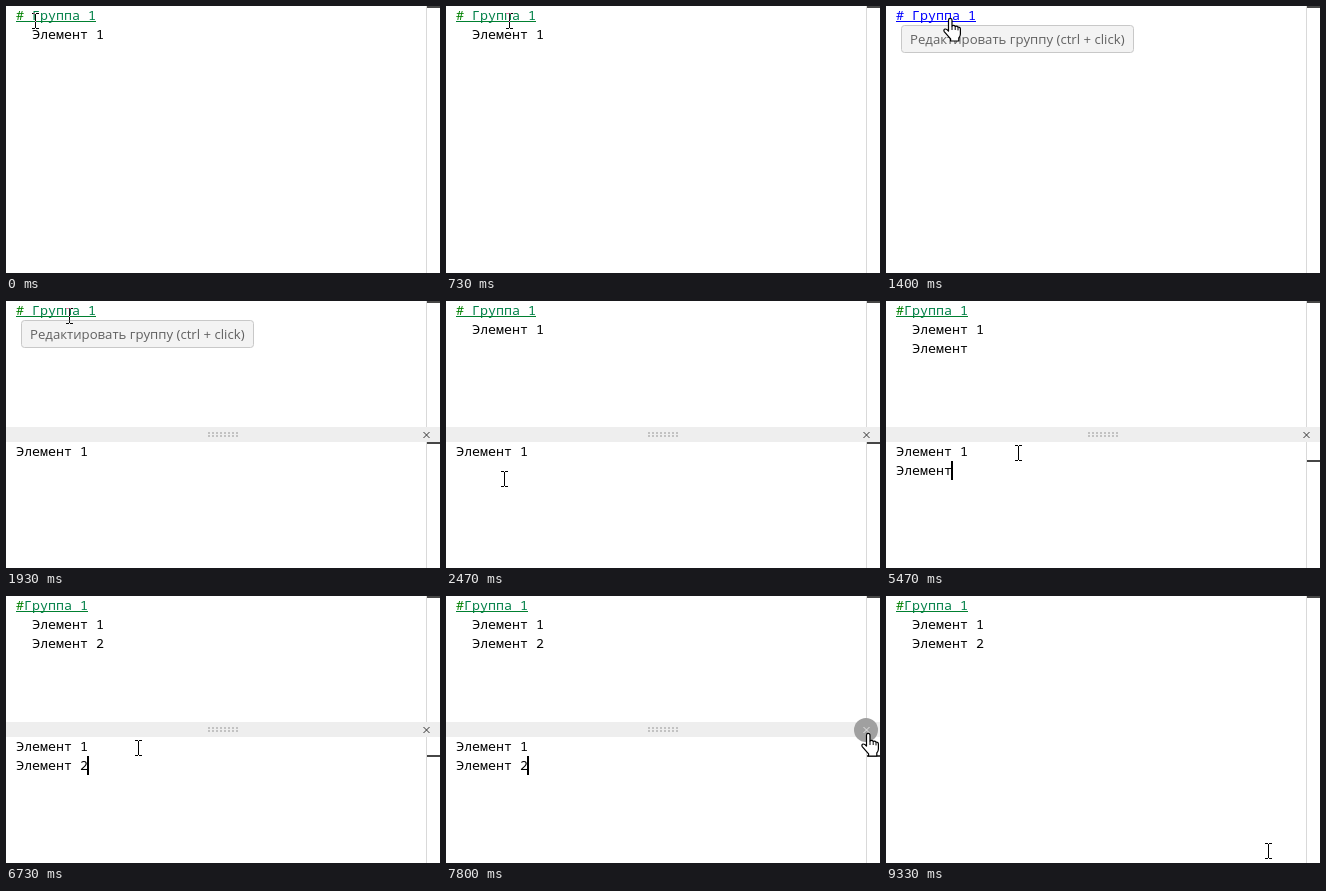
An HTML page that plays this animation: 434 px wide and 267 px high, repeating every 9400 ms.

```html
<!DOCTYPE html>
<html lang="ru">
<head>
<meta charset="utf-8">
<style>
  html, body { margin: 0; width: 100%; height: 100%; overflow: hidden; background: #fff; }
  svg { display: block; }
  rect { shape-rendering: crispEdges; }
  .code { font: 13.333px "Noto Sans Mono", "DejaVu Sans Mono", monospace; }
  .hint { font: 13.2px "Open Sans", "Noto Sans", sans-serif; fill: #616161; }
  .mark { fill: #464646; }
  .edge { fill: #d9d9d9; }
  #beam { fill: #fff; mix-blend-mode: difference; }
</style>
</head>
<body>
<svg width="434" height="267" viewBox="0 0 434 267">
  <rect width="434" height="267" fill="#fff"/>
  <rect class="edge" x="420" width="1" height="267"/>
  <rect class="mark" x="421" width="13" height="2"/>
  <g class="code">
    <text x="10" y="14"><tspan id="hash">#</tspan><tspan id="title"></tspan></text>
    <rect id="underline" x="10" y="15" height="1"/>
    <text x="26" y="33">Элемент 1</text>
    <text id="copy" x="26" y="52"></text>
  </g>
  <g id="panel">
    <rect y="126" width="434" height="141" fill="#fff"/>
    <rect y="126" width="434" height="15" fill="#eee"/>
    <path d="M202 132h32m-32 3h32" stroke="#c2c2c2" stroke-width="2" stroke-dasharray="2"/>
    <circle id="halo" cx="420" cy="134" r="12" fill="#a0a0a0"/>
    <path id="cross" d="M417.5 131l6 6m0-6l-6 6"/>
    <g id="editor" class="code">
      <rect class="edge" x="420" y="141" width="1" height="126"/>
      <rect id="row" class="mark" x="421" width="13" height="2"/>
      <text x="10" y="155">Элемент 1</text>
      <text id="typed" x="10" y="174"></text>
      <rect id="caret" width="2" height="19"/>
    </g>
  </g>
  <g id="tip">
    <rect x="15.5" y="19.5" width="232" height="27" rx="3" fill="#f3f3f3" stroke="#c8c8c8" style="shape-rendering:auto"/>
    <text class="hint" x="24" y="38">Редактировать группу (ctrl + click)</text>
  </g>
  <g id="beam">
    <rect x="-3" y="-8" width="3" height="1"/><rect x="1" y="-8" width="3" height="1"/>
    <rect y="-7" width="1" height="14"/>
    <rect x="-3" y="7" width="3" height="1"/><rect x="1" y="7" width="3" height="1"/>
  </g>
  <g id="hand" fill="#fff" stroke="#000" stroke-width="1.2" stroke-linejoin="round">
    <path d="M-.5 13V2.2a1.75 1.75 0 0 1 3.5 0V8q1.8-1.2 3.2.4q1.7-.8 2.8.7q2.3-.3 2.4 1.9V16q0 2.2-1.6 4v3H1.6V20.8L-4.8 13.6Q-5.7 11.5-4 11Q-2.4 10.8-.5 13Z"/>
    <path d="M3 8v4M6.2 8.6V12M9 9.4V12.4" fill="none" stroke-width="1"/>
  </g>
</svg>
<script>
const LOOP = 9400, FRAME = 1000 / 15;
const FOCUS = 2800, NEWLINE = 3530, BLINK = 500;
const ENTRY = "Элемент 2";
const ui = Object.fromEntries([...document.querySelectorAll("[id]")].map(el => [el.id, el]));

// Pointer moves: begin, end, destination.
const moves = [
  [0, 270, 122, 39], [270, 730, 63, 15],
  [2070, 2470, 58, 178], [2470, 2600, 132, 152],
  [7130, 7330, 394, 125], [7530, 7800, 421, 140],
  [8270, 8400, 177, 249], [8470, 9330, 382, 255]
];

// The word is typed at a rising pace, then a pause, a space and the digit.
const letters = Array.from({ length: 7 }, (_, i) => 4000 + 1470 * (i / 6) ** 0.58);
const keys = [...letters, 6270, 6730];

const ramp = (t, a, b) => Math.min(1, Math.max(0, (t - a) / (b - a)));
const ease = p => p * p * (3 - 2 * p);
const between = (t, a, b) => t >= a && t < b;
const show = (el, on) => el.setAttribute("visibility", on ? "inherit" : "hidden");
const set = (el, attrs) => { for (const key in attrs) el.setAttribute(key, attrs[key]); };
const write = (el, text) => { if (el.textContent !== text) el.textContent = text; };

function pointerAt(t) {
  let x = 29, y = 15;
  for (const [begin, end, toX, toY] of moves) {
    const p = ease(ramp(t, begin, end));
    x += (toX - x) * p;
    y += (toY - y) * p;
  }
  return [Math.round(x), Math.round(y)];
}

function drawTitle(t) {
  const active = between(t, 1270, 1930);
  const title = t >= NEWLINE ? "Группа 1" : " Группа 1";
  write(ui.title, title);
  set(ui.hash, { fill: active ? "#00f" : "#008000" });
  set(ui.title, { fill: active ? "#00f" : "#008048" });
  set(ui.underline, { fill: active ? "#00f" : "#008030", width: 8 * (title.length + 1) });
}

function drawEditor(t) {
  const edited = t >= NEWLINE;
  const count = keys.filter(key => key <= t).length;
  const text = ENTRY.slice(0, count);
  write(ui.copy, text);
  write(ui.typed, text);

  const lastInput = keys[count - 1] ?? (edited ? NEWLINE : FOCUS);
  const idle = t - lastInput;
  show(ui.caret, idle >= 0 && idle % (2 * BLINK) < BLINK);
  set(ui.caret, { x: 9 + 8 * (edited ? count : ENTRY.length), y: edited ? 160 : 141 });
  set(ui.row, { y: edited ? 159 : 141 });
}

function drawPanel(t) {
  const glow = ramp(t, 7670, 7800);
  show(ui.panel, between(t, 1730, 8070));
  show(ui.editor, t >= 1800);
  set(ui.halo, { opacity: glow });
  set(ui.cross, { stroke: glow ? "#e4e4e4" : "#333" });
  set(ui.tip, { opacity: ramp(t, 1000, 1130) - ramp(t, 2130, 2270) });
}

function drawPointer(t) {
  const [x, y] = pointerAt(t);
  const overLink = between(t, 1270, 1930) || between(t, 7730, 8330);
  const away = between(t, 8470, 9330);
  show(ui.hand, overLink);
  show(ui.beam, !overLink && !away);
  set(ui.beam, { transform: `translate(${x} ${y})` });
  set(ui.hand, { transform: `translate(${x} ${y - 3})` });
}

function draw(time) {
  const t = Math.floor((time + 5) / FRAME) * FRAME + 4;
  for (const part of [drawTitle, drawEditor, drawPanel, drawPointer]) part(t);
}

const start = performance.now();
function frame() {
  draw((performance.now() - start) % LOOP);
  requestAnimationFrame(frame);
}
draw(0);
requestAnimationFrame(frame);
</script>
</body>
</html>
```
